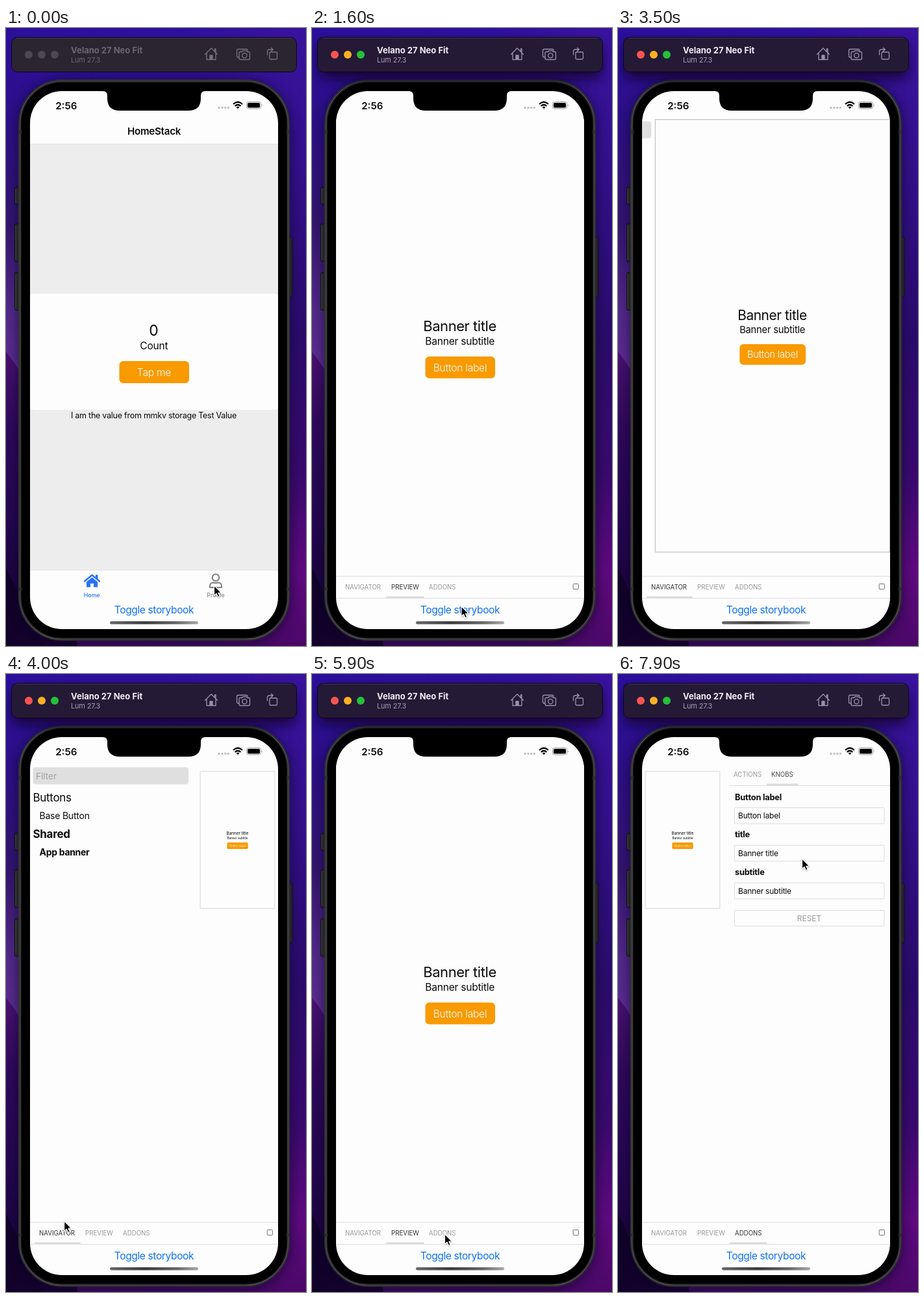
Write an HTML page that moves like this. It is 462x950 px and loops after 8 s.

```html
<!DOCTYPE html>
<html lang="en">
<head>
<meta charset="utf-8">
<title>Simulator demo</title>
<style>
  html, body { margin: 0; width: 100%; height: 100%; overflow: hidden; background: #1c0744; }
  svg { display: block; width: 462px; height: 950px; }
  text { font-family: Inter, "Liberation Sans", sans-serif; white-space: pre; }
</style>
</head>
<body>
<svg id="stage" viewBox="0 0 462 950" xmlns="http://www.w3.org/2000/svg"></svg>
<script>
const LOOP = 8000, STEP = 100;
const FOCUS = 200, TOGGLE = 1500;
const OPEN_NAV = 3441, CLOSE_NAV = 5150, OPEN_ADDONS = 6050, SLIDE = 300;
const PANEL = 249;
const BLUE = '#1172ee', ORANGE = '#f89a00';

// pointer stops: time, x, y
const POINTER = [
  [0, 320.5, 857], [200, 320.5, 857], [600, 238.5, 828], [800, 238.5, 828],
  [1200, 230, 889], [1600, 230, 889], [2200, 420.5, 360], [2500, 420.5, 360],
  [3200, 80, 859], [3900, 80, 859], [4700, 389.5, 282], [5200, 389.5, 282],
  [5800, 204.5, 861], [6500, 204.5, 861], [7600, 283.5, 284], [8000, 283.5, 284]
];

// text placed by the middle of its capitals
function label(x, mid, str, size, o = {}) {
  const { fill = '#0b0b0b', weight = 400, anchor = 'start', gap = 0, id = '' } = o;
  return `<text ${id && `id="${id}"`} x="${x}" y="${mid + size * 0.364}" font-size="${size}" font-weight="${weight}"
    fill="${fill}" text-anchor="${anchor}" letter-spacing="${gap}">${str}</text>`;
}
const mid = (x, y, str, size, o) => label(x, y, str, size, { anchor: 'middle', ...o });
const box = (x, y, w, h, fill, r = 0, more = '') =>
  `<rect x="${x}" y="${y}" width="${w}" height="${h}" rx="${r}" fill="${fill}" ${more}/>`;
const line = (x1, y, x2, color = '#dcdcdc') => box(x1, y, x2 - x1, 1, color);
const ramp = (id, attrs, stops) => `<linearGradient id="${id}" ${attrs}>` +
  stops.map(([at, c]) => `<stop offset="${at}" stop-color="${c}"/>`).join('') + '</linearGradient>';

const defs = `<defs>
  ${ramp('sky', 'x1="0" y1="0" x2="0" y2="1"',
    [[0, '#2c109c'], [0.15, '#2d1088'], [0.32, '#35166f'], [0.46, '#532a8a'], [0.54, '#5d2d92'], [1, '#3a0d62']])}
  ${ramp('hill', 'x1="0" y1="0" x2="0" y2="1"',
    [[0, '#4a1272'], [0.25, '#300a5c'], [0.6, '#240750'], [1, '#15042f']])}
  ${ramp('side', 'x1="0" y1="0" x2="0" y2="1"',
    [[0, '#3a139e'], [0.25, '#33108a'], [0.5, '#280a6a'], [0.72, '#38096d'], [0.88, '#5f0a80'], [1, '#4c0868']])}
  ${ramp('fade', 'x1="0" y1="0" x2="1" y2="0"', [[0, '#000'], [0.6, '#333'], [1, '#fff']])}
  ${ramp('bar', 'x1="0" y1="0" x2="1" y2="0"', [[0, '#686868'], [0.4, '#3c3c3c'], [0.75, '#666'], [1, '#a8a8a8']])}
  <mask id="right"><rect width="462" height="950" fill="url(#fade)"/></mask>
  <clipPath id="screen"><rect x="37" y="97" width="382" height="827" rx="49"/></clipPath>
  <clipPath id="stageArea"><rect x="37" y="130" width="382" height="713"/></clipPath>
  <filter id="soft" x="-30%" y="-30%" width="160%" height="160%"><feGaussianBlur stdDeviation="9"/></filter>
  <filter id="drop" x="-50%" y="-50%" width="220%" height="220%">
    <feDropShadow dx="0" dy="1" stdDeviation="1" flood-opacity=".35"/></filter>
</defs>`;

const wallpaper = box(0, 0, 462, 950, 'url(#sky)') +
  '<path d="M0 498C40 545 70 620 110 950H0Z" fill="url(#hill)"/>' +
  '<path d="M0 830C20 870 40 910 60 950H0Z" fill="#12032b"/>' +
  '<rect width="462" height="950" fill="url(#side)" mask="url(#right)"/>';

const titleBar = `
  <rect id="glow" x="10" y="24" width="436" height="54" rx="12" fill="#08021c" opacity=".75" filter="url(#soft)"/>
  <rect id="bar-bg" x="8.5" y="14.5" width="439" height="53" rx="9" stroke="#0d0818"/>
  <path d="M16 15.5H440" stroke="#4b4258" stroke-opacity=".7"/>
  ${[35, 55, 75].map(x => `<circle class="light" cx="${x}" cy="41" r="6"/>`).join('')}
  ${label(100, 34.5, 'Velano 27 Neo Fit', 13, { weight: 700, id: 'device' })}
  ${label(100, 49.2, 'Lum 27.3', 11, { id: 'system', gap: -0.2 })}
  <g id="tools" fill="none" stroke-width="1.3" stroke-linejoin="round" stroke-linecap="round">
    <path d="M306.5 40.5L316 31L325.5 40.5M309 38.5V48.500H323V38.500M321.500 36V32H323V37.500"/>
    <path d="M314 48V42H318V48Z" fill="currentColor"/>
    <path d="M359 45H357.500Q355.500 45 355.500 43V34.500Q355.500 32.500 357.500 32.500H370Q372 32.500 372 34.500"/>
    <path d="M361 36.500H363.500L365 34.800H370L371.500 36.500H373.500Q375.500 36.500 375.500 38.500V46.500Q375.500 48.500 373.500 48.500H361Q359 48.500 359 46.500V38.500Q359 36.500 361 36.500Z"/>
    <circle cx="367.300" cy="42.300" r="3.600"/>
    <rect x="406" y="37" width="11.500" height="11" rx="1.500"/>
    <path d="M402.500 41V36Q402.500 33 406 33H411M408.500 30.500L411.300 33L408.500 35.500"/>
  </g>`;

const sideKey = (x, y, w, h) => box(x, y, w, h, '#242326', 2, 'stroke="#101012"') +
  box(x + 1, y + 2, 1, h - 4, '#454448');

const phone = `
  <rect x="18" y="80" width="420" height="866" rx="70" fill="#07021a" opacity=".55" filter="url(#soft)"/>
  ${sideKey(13.5, 245, 8, 26)}${sideKey(13.5, 301, 8, 58)}${sideKey(13.5, 376, 8, 58)}${sideKey(434, 322, 7, 91)}
  <rect x="19.5" y="79.500" width="417" height="862" rx="67" fill="#1c1c1d" stroke="#39393b"/>
  <rect x="21.500" y="81.500" width="413" height="858" rx="65" fill="none" stroke="#58585a" stroke-width="1.200"/>
  <rect x="24" y="84" width="408" height="853" rx="62" fill="#000"/>
  ${[157, 860].map(y => box(19, y, 5, 5, '#2d2d2f') + box(432, y, 5, 5, '#2d2d2f')).join('')}`;

const home = `<g id="home">
  ${box(37, 178, 382, 656, '#ededed')}
  ${line(37, 178, 419, '#e2e2e2')}
  ${mid(228, 158.5, 'HomeStack', 15.2, { weight: 600, gap: -0.3 })}
  ${box(37, 408.5, 382, 178.5, '#fdfdfd', 5)}
  ${mid(227.5, 464.5, '0', 23)}
  ${mid(227.8, 488, 'Count', 15.6, { gap: -0.25 })}
  ${box(174.5, 512, 107.5, 34, ORANGE, 6)}
  ${mid(228, 529.5, 'Tap me', 15.6, { fill: '#fff', weight: 300, gap: -0.25 })}
  ${mid(227.5, 595, 'I am the value from mmkv storage Test Value', 12.5, { gap: -0.25 })}
  ${line(37, 833, 419, '#e6e6e6')}
  <g fill="#2a72f5">
    <path d="M121 850.5L132.5 841L144 850.500" fill="none" stroke="#2a72f5" stroke-width="2.400" stroke-linecap="round" stroke-linejoin="round"/>
    <path d="M124 851.500L132.500 844.500L141 851.500V859.500H135V854H130V859.500H124Z"/>
    <path d="M138 840.500H141.500V847L138 844Z"/>
  </g>
  <g fill="none" stroke="#808084" stroke-width="2">
    <circle cx="323" cy="844.700" r="5.300"/>
    <path d="M314 860V858Q314 852.500 319.500 852.500Q323 854 326.500 852.500Q332 852.500 332 858V860Z" stroke-linejoin="round"/>
  </g>
  ${mid(132.3, 871.5, 'Home', 8.9, { fill: '#2a72f5', weight: 500 })}
  ${mid(323, 871.5, 'Profile', 9, { fill: '#808084' })}
</g>`;

const preview = `<g id="preview">
  <rect id="frame" x="-191" y="-351.5" width="382" height="703" fill="#fdfdfd" stroke="#b4b4b4" vector-effect="non-scaling-stroke"/>
  ${mid(-0.5, -34, 'Banner title', 22, { gap: -0.45 })}
  ${mid(-0.3, -10.5, 'Banner subtitle', 15.6, { gap: -0.25 })}
  ${box(-53.5, 13.5, 107.5, 33.5, ORANGE, 6)}
  ${mid(0, 30.5, 'Button label', 15.6, { fill: '#fff', weight: 300, gap: -0.25 })}
</g>`;

const navigator_ = `<g id="nav">
  ${box(41.5, 143.5, 239.5, 26, '#dfdfdf', 4)}
  ${label(46, 157, 'Filter', 13.6, { fill: '#a2a2a2' })}
  ${label(41.5, 190, 'Buttons', 17, { gap: -0.3 })}
  ${label(51.5, 218, 'Base Button', 14, { gap: -0.22 })}
  ${label(41.5, 246, 'Shared', 17, { weight: 700, gap: -0.3 })}
  ${label(51.5, 274, 'App banner', 14, { weight: 700, gap: -0.3 })}
</g>`;

const field = (y, name, value) => label(180, y, name, 12.8, { weight: 700, gap: -0.2 }) +
  box(179.5, y + 16.5, 230.5, 24.5, '#fdfdfd', 1, 'stroke="#dcdcdc"') +
  label(185, y + 29, value, 12, { gap: -0.22 });

const addons = `<g id="addons">
  ${label(178, 154, 'ACTIONS', 9.7, { fill: '#999' })}
  ${label(236, 154, 'KNOBS', 9.7, { fill: '#444' })}
  ${line(171, 171, 420)}
  ${box(229, 168.5, 48, 3, '#dcdcdc')}
  ${field(189, 'Button label', 'Button label')}
  ${field(246.8, 'title', 'Banner title')}
  ${field(304.6, 'subtitle', 'Banner subtitle')}
  ${box(179.5, 363.5, 230.5, 24, '#fdfdfd', 1, 'stroke="#dcdcdc"')}
  ${mid(294.5, 376, 'RESET', 12, { fill: '#999' })}
</g>`;

// name, text x, underline x, underline width
const TABS = [['NAVIGATOR', 51, 44, 70.5], ['PREVIEW', 122, 114.500, 58], ['ADDONS', 180, 172.500, 57]];
const storybook = `<g id="book">
  <g clip-path="url(#stageArea)">${navigator_}${addons}${preview}</g>
  ${box(37, 843, 382, 34, '#fdfdfd')}
  ${line(37, 842.5, 419)}${line(37, 876.200, 419)}
  ${TABS.map(([name, x, ux, w]) =>
    `<g class="tab">${label(x, 859, name, 9.7)}${box(ux, 873.500, w, 3.200, '#dcdcdc')}</g>`).join('')}
  <rect x="402.200" y="854.500" width="8.200" height="8.200" rx="1" fill="none" stroke="#707070"/>
</g>`;

const chrome = `
  ${mid(228, 894, 'Toggle storybook', 15.6, { fill: BLUE, gap: -0.4 })}
  ${box(160, 912, 136, 4.600, 'url(#bar)', 2.300)}
  ${mid(92.8, 119, '2:56', 15.2, { weight: 600 })}
  ${[328, 333, 337.700, 342.300].map(x => `<circle cx="${x}" cy="122.500" r="1.700" fill="#c0c0c0"/>`).join('')}
  <g fill="none" stroke="#000" stroke-width="2.200">
    <path d="M350 117Q357 110.500 364 117M352.600 120Q357 116 361.400 120"/>
  </g>
  <path d="M354.600 121.700Q357 119.800 359.400 121.700L357 124.300Z"/>
  <rect x="370.500" y="113.500" width="22" height="10.500" rx="3" fill="none" stroke="#999"/>
  ${box(372, 115, 19, 7.500, '#000', 1.800)}
  <path d="M394 116.700Q395.800 118.700 394 120.800Z" fill="#999"/>`;

const notch = '<path d="M149 96H307V97Q300 97 300 104V108Q300 127 281 127H175Q156 127 156 108V104Q156 97 149 97Z"/>';

const arrow = `<path id="arrow" d="M0 0V15.500L3.600 12.200L6 17.600L8.700 16.400L6.300 11.200H11Z"
  fill="#000" stroke="#fff" stroke-width="1.100" stroke-linejoin="round" filter="url(#drop)"/>`;

const stage = document.getElementById('stage');
stage.innerHTML = defs + wallpaper + phone + titleBar +
  `<g clip-path="url(#screen)">${box(37, 97, 382, 827, '#fdfdfd')}${home}${storybook}${chrome}</g>` +
  notch + arrow;

const el = id => document.getElementById(id);
const set = (node, attrs) => Object.entries(attrs).forEach(([k, v]) => node.setAttribute(k, v));
const show = (node, on) => set(node, { visibility: on ? 'visible' : 'hidden' });
const lights = [...document.querySelectorAll('.light')];
const tabs = [...document.querySelectorAll('.tab')];

const ease = u => u < 0.5 ? 2 * u * u : 1 - 2 * (1 - u) ** 2;
const slide = (t, start) => ease(Math.min(1, Math.max(0, (t - start) / SLIDE)));

function pointerAt(t) {
  const i = Math.max(1, POINTER.findIndex(p => p[0] > t));
  const [t0, x0, y0] = POINTER[i - 1], [t1, x1, y1] = POINTER[i];
  const u = ease((t - t0) / (t1 - t0));
  return [x0 + (x1 - x0) * u, y0 + (y1 - y0) * u];
}

function drawTitle(active) {
  show(el('glow'), active);
  set(el('bar-bg'), { fill: active ? '#241a35' : '#2a2530' });
  const colors = active ? ['#ff5450', '#fdb024', '#24c138'] : Array(3).fill('#4d4754');
  lights.forEach((l, i) => set(l, { fill: colors[i] }));
  set(el('device'), { fill: active ? '#f3eef8' : '#6b6574' });
  set(el('system'), { fill: active ? '#a69db3' : '#6b6574' });
  const ink = active ? '#9a91aa' : '#79727f';
  set(el('tools'), { stroke: ink, color: ink });
}

function drawBook(t) {
  const nav = slide(t, OPEN_NAV) - slide(t, CLOSE_NAV), add = slide(t, OPEN_ADDONS);
  const open = nav + add, dir = nav - add;
  set(el('preview'), {
    transform: `translate(${228 + 128.5 * dir} ${491.5 - 236.5 * open}) scale(${1 - 0.7 * open})`
  });
  set(el('frame'), { 'stroke-opacity': open ? 1 - 0.5 * open : 0 });
  set(el('nav'), { transform: `translate(${PANEL * (nav - 1)} 0)` });
  set(el('addons'), { transform: `translate(${PANEL * (1 - add)} 0)` });
  const current = t >= OPEN_ADDONS ? 2 : t >= OPEN_NAV && t < CLOSE_NAV ? 0 : 1;
  tabs.forEach((tab, i) => {
    set(tab.firstChild, { fill: i === current ? '#333' : '#999' });
    set(tab.lastChild, { opacity: i === current ? 1 : 0 });
  });
}

function draw(t) {
  const book = t >= TOGGLE;
  drawTitle(t >= FOCUS);
  set(el('home'), { display: book ? 'none' : 'inline' });
  set(el('book'), { display: book ? 'inline' : 'none' });
  drawBook(t);
  set(el('arrow'), { transform: `translate(${pointerAt(t).join(' ')})` });
  show(el('arrow'), t < 3400 || t >= 3600);
}

const begin = performance.now();
function tick() {
  const t = (performance.now() - begin) % LOOP;
  draw(Math.floor(t / STEP) * STEP);
  requestAnimationFrame(tick);
}
tick();
</script>
</body>
</html>
```
